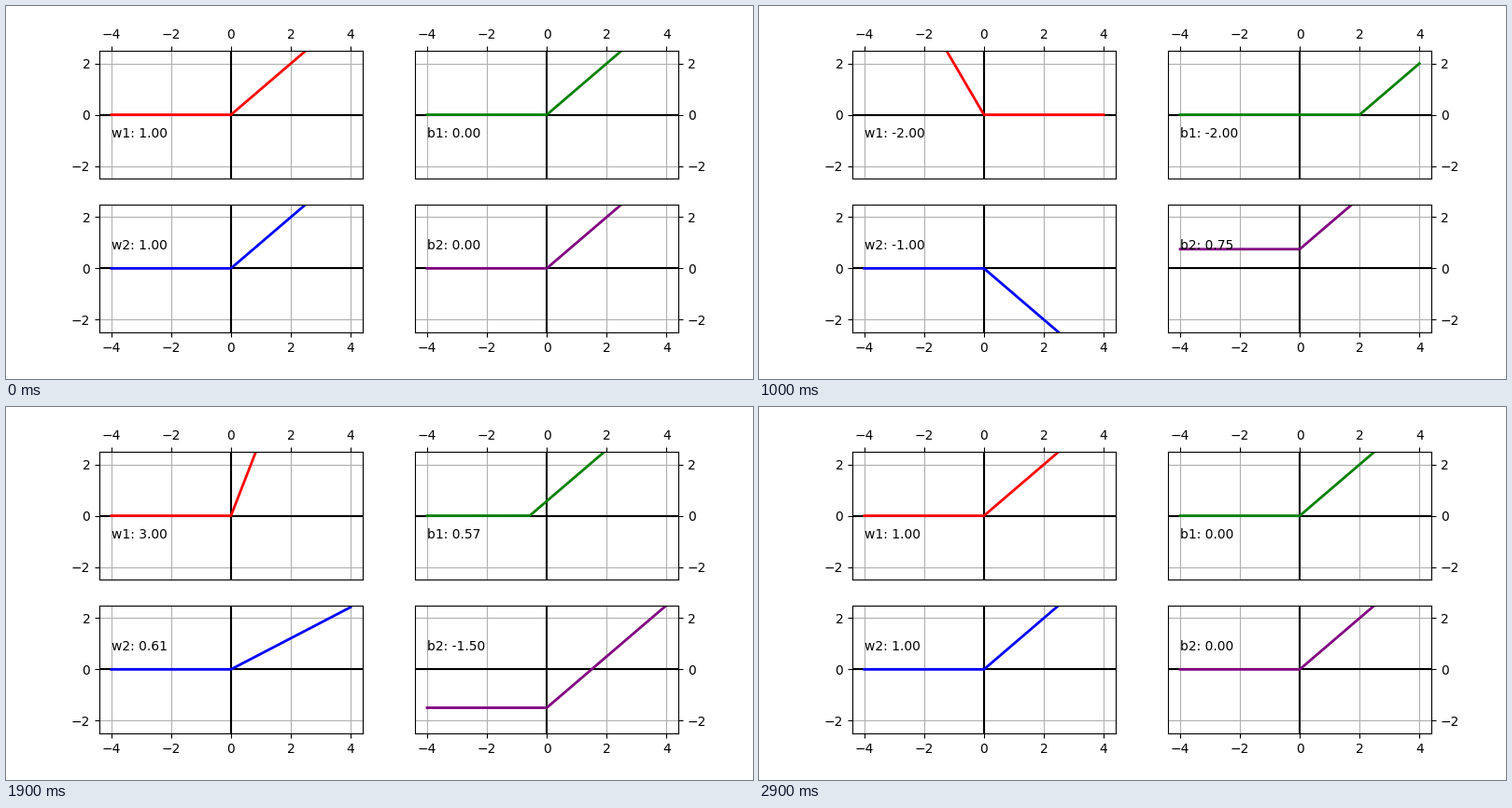
Recreate the animation shown at these times as a matplotlib script. Size 800 px wide and 400 px high, loop 3 s.

```python
import numpy as np
import matplotlib.pyplot as plt
from matplotlib.animation import FuncAnimation

FRAMES = 30
X = np.linspace(-4, 4, 1001)


def relu(v):
    return np.maximum(v, 0)


def sweep(start, first, second, turns):
    """Go linearly start -> first -> second -> start, resting one frame at
    each turn; turns are the frames where a new leg begins."""
    stops = [start, first, second, start]
    edges = [0, *turns, FRAMES]
    legs = zip(stops, stops[1:], np.diff(edges))
    return np.concatenate([np.linspace(a, b, n) for a, b, n in legs])


# name, colour, curve, parameter value over the loop
PANELS = [
    ("w1", "red", lambda p: relu(p * X), sweep(1, -2, 3, (10, 20))),
    ("b1", "green", lambda p: relu(X + p), sweep(0, -2, 2, (10, 25))),
    ("w2", "blue", lambda p: p * relu(X), sweep(1, -1, 1.5, (10, 25))),
    ("b2", "purple", lambda p: relu(X) + p, sweep(0, 2, -1.5, (5, 20))),
]


def style_axes(ax, top, right):
    ax.set(xlim=(-4.4, 4.4), ylim=(-2.5, 2.5),
           xticks=range(-4, 5, 2), yticks=range(-2, 3, 2))
    ax.grid(True)
    ax.axhline(0, color="black")
    ax.axvline(0, color="black")
    if top:
        ax.xaxis.tick_top()
    if right:
        ax.yaxis.tick_right()


fig, axes = plt.subplots(2, 2, figsize=(8, 4), dpi=100)
fig.subplots_adjust(left=0.125, right=0.9, bottom=0.125, top=0.88,
                    wspace=0.2, hspace=0.2)

lines, labels = [], []
for i, (ax, panel) in enumerate(zip(axes.flat, PANELS)):
    top, right = i < 2, i % 2 == 1
    style_axes(ax, top, right)
    lines += ax.plot(X, 0 * X, color=panel[1], lw=2)
    labels.append(ax.text(-4, -0.9 if top else 0.75, ""))


def update(frame):
    for line, label, (name, _, curve, values) in zip(lines, labels, PANELS):
        value = values[frame]
        line.set_ydata(curve(value))
        # adding 0.0 after rounding avoids "-0.00"
        label.set_text(f"{name}: {round(value, 2) + 0.0:.2f}")
    return lines + labels


anim = FuncAnimation(fig, update, frames=FRAMES, interval=100,
                     repeat=True, repeat_delay=0)
plt.show()
```
